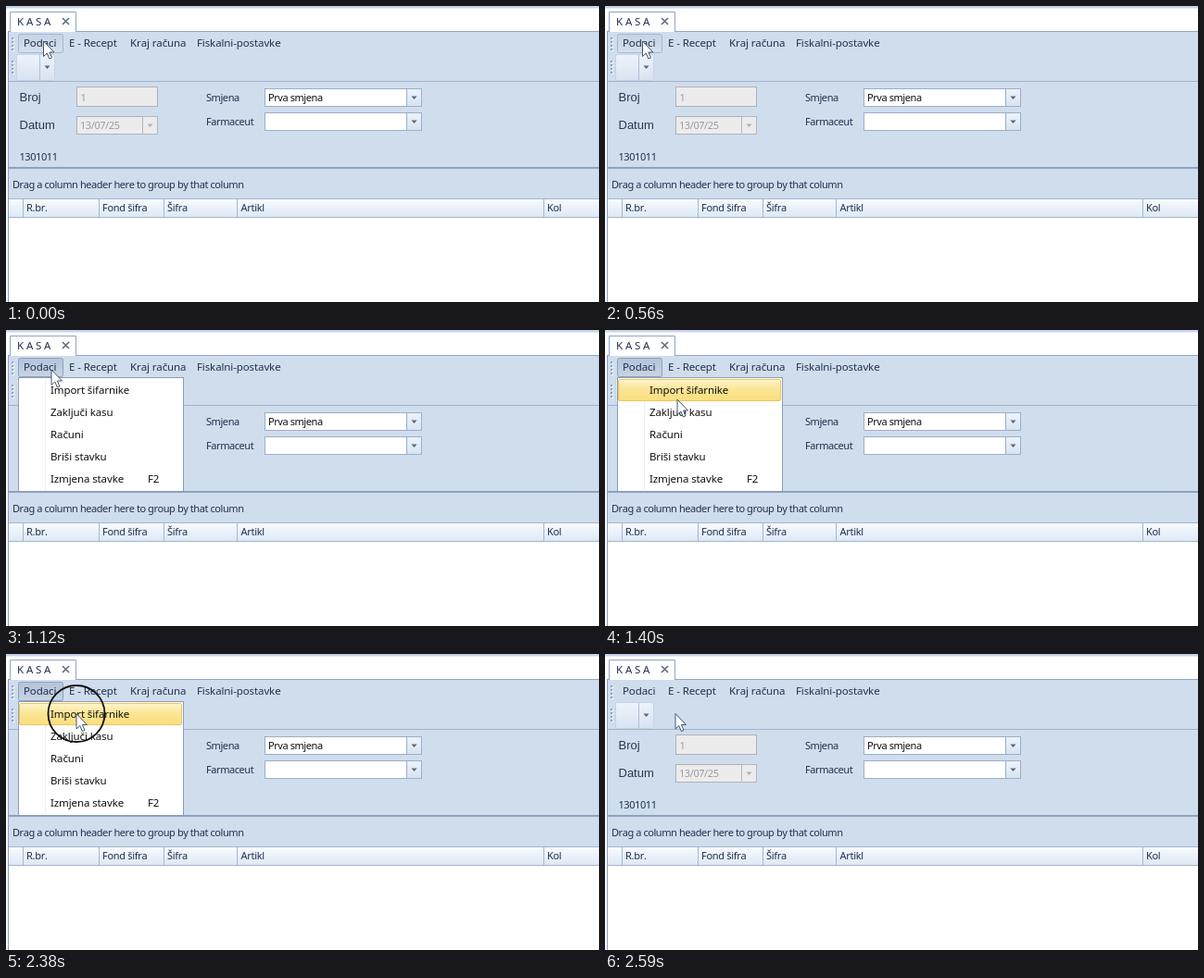
These frames come from a looping animation (640 by 320 pixels, 2660 ms). An HTML page:

```html
<!DOCTYPE html>
<html lang="hr">
<head>
<meta charset="utf-8">
<title>Kasa</title>
<style>
  html, body { margin: 0; width: 100%; height: 100%; overflow: hidden; background: #d0dded; }
  svg { display: block; width: 640px; height: 320px; }
  text { font: 11px "Noto Sans", sans-serif; font-kerning: none; letter-spacing: -.43px; fill: #20304f; white-space: pre; }
  .menu { font-size: 11.5px; letter-spacing: -.11px; }
  .head { letter-spacing: -.3px; }
  .label { font: 13px "Liberation Sans", sans-serif; letter-spacing: 0; fill: #29364f; }
  .off { fill: #999da3; }
  .black { fill: #101010; }
  .crisp { shape-rendering: crispEdges; }
</style>
</head>
<body>
<svg viewBox="0 0 640 320">
  <defs>
    <linearGradient id="header" x2="0" y2="1"><stop stop-color="#fafcff"/><stop offset="1" stop-color="#dce7f4"/></linearGradient>
    <linearGradient id="button" x2="0" y2="1"><stop stop-color="#edf3fb"/><stop offset="1" stop-color="#d8e3f1"/></linearGradient>
    <linearGradient id="hover" x2="0" y2="1"><stop stop-color="#c6d3e5"/><stop offset="1" stop-color="#d6e0ed"/></linearGradient>
    <linearGradient id="pressed" x2="0" y2="1"><stop stop-color="#b5c3d8"/><stop offset="1" stop-color="#c8d4e5"/></linearGradient>
    <linearGradient id="gold" x2="0" y2="1"><stop stop-color="#fff5cd"/><stop offset=".45" stop-color="#fbe596"/><stop offset="1" stop-color="#fbdf7d"/></linearGradient>
  </defs>
  <g id="screen"></g>
  <g id="popup"></g>
  <circle id="ring" r="30.5" fill="none" stroke="#111" stroke-width="1.8"/>
  <path id="cursor" d="M0 0V16.5L3.8 13 6.4 19 9 17.9 6.4 12H11.5Z" fill="#fff" stroke="#46566f" stroke-width="1"/>
</svg>
<script>
const LOOP = 2660, STEP = 70;
const $ = id => document.getElementById(id);
const line = (x1, y1, x2, y2, color, width = 1) =>
  `<path class="crisp" d="M${x1} ${y1}L${x2} ${y2}" stroke="${color}" stroke-width="${width}"/>`;
const box = (x, y, w, h, fill, stroke = "none", extra = "") =>
  `<rect x="${x + .5}" y="${y + .5}" width="${w}" height="${h}" fill="${fill}" stroke="${stroke}" ${extra}/>`;
const text = (x, y, s, cls = "") => `<text x="${x}" y="${y}" class="${cls}">${s}</text>`;
const arrow = (x, y, color = "#5a6679") => `<path d="M${x - 3} ${y}h6l-3 3.5z" fill="${color}"/>`;
const grip = y => [0, 4, 8, 12].map(d =>
  box(6.5, y + d + .5, 2, 2, "#f3f7fc") + box(5.5, y + d - .5, 2, 2, "#8fa3c0")).join("");
const combo = y => box(279, y, 169, 19, "#fff", "#9aafcb") +
  box(432, y, 16, 19, "url(#button)", "#9aafcb") + arrow(440.5, y + 8.5);

$("screen").innerHTML = [
  box(-.5, -.5, 640, 320, "#fff"),
  box(1.5, 26.5, 639, 181, "#d0dded"),
  line(0, 1, 640, 1, "#c6d5e8", 2), line(0, 2.5, 640, 2.5, "#e3ecf6"),
  line(2.5, 27.5, 640, 27.5, "#91a6c3"), line(2.5, 27, 2.5, 320, "#8ba1bf"),
  `<path d="M4.5 28V6.5h71V28" fill="#fff" stroke="#91a6c3"/>`,
  text(12, 21, "K A S A", "menu"),
  `<path d="M61 13l7 7m0-7l-7 7" stroke="#5f6c82" stroke-width="1.6"/>`,

  grip(34), grip(59),
  box(13, 30, 48, 20, "none", "none", 'id="tab" rx="2"'),
  text(19, 44, "Podaci", "menu"), text(68, 44, "E - Recept", "menu"),
  text(134, 44, "Kraj računa", "menu"), text(206, 44, "Fiskalni-postavke", "menu"),
  box(11, 52, 41, 28, "url(#button)", "#c6d4e7", 'rx="2"'),
  line(36.5, 53, 36.5, 80, "#b0c1d8"), arrow(44.5, 64.5),
  line(3, 81.5, 640, 81.5, "#9fb2cc"),

  text(14.5, 103, "Broj", "label"), text(14.5, 133, "Datum", "label"),
  box(76, 87, 87, 21, "#ececec", "#adb2b9"), text(80.5, 103, "1", "off"),
  box(76, 119, 87, 19, "#ececec", "#adb2b9"), text(80, 133, "13/07/25", "off"),
  box(147, 119, 16, 19, "#ececec", "#b3b8bf"), arrow(155.5, 127.5, "#acafb4"),
  text(14.5, 167, "1301011"),
  text(216, 103, "Smjena"), text(216, 129, "Farmaceut"),
  combo(89), combo(115), text(283, 103, "Prva smjena", "black"),

  line(3, 175, 640, 175, "#8da2c0", 2),
  text(7, 197, "Drag a column header here to group by that column"),
  box(2.5, 207.5, 638, 21, "url(#header)"),
  line(3, 208.5, 640, 208.5, "#a3b6d0"), line(3, 228.5, 640, 228.5, "#a3b6d0"),
  ...[18, 100, 170, 249, 580].map(x => line(x + .5, 208, x + .5, 229, "#a3b6d0")),
  ...[[22, "R.br."], [104, "Fond šifra"], [174, "Šifra"], [253.5, "Artikl"], [584, "Kol"]]
    .map(([x, s]) => text(x, 222, s, "head"))
].join("");

$("popup").innerHTML = [
  box(13, 51, 178, 123, "#fff", "#8c9cb5"),
  line(42.5, 53, 42.5, 173, "#edf0f4"),
  box(14, 53, 175, 23, "url(#gold)", "#e6c661", 'id="highlight" rx="1.5"'),
  ...["Import šifarnike", "Zaključi kasu", "Računi", "Briši stavku", "Izmjena stavke"]
    .map((s, i) => text(48, 69 + 24 * i, s, "menu black")),
  text(153, 165, "F2", "menu black")
].join("");

// Cursor tip on each step of the move, with a small overshoot at the end.
const MOVE_START = 1120;
const path = [[49, 43], [59, 51], [68, 60], [75, 69], [78, 75], [78, 72], [77, 67], [76, 64.5]];

function cursorAt(t) {
  if (t < MOVE_START) return [40.5, 38];
  return path[Math.min(path.length - 1, Math.floor((t - MOVE_START) / STEP))];
}

const show = (id, on) => $(id).setAttribute("visibility", on ? "inherit" : "hidden");
const clicked = (t, start) => t >= start && t < start + STEP;

function draw(now) {
  const t = now % LOOP;
  const [x, y] = cursorAt(t);
  const open = t >= 630 && t < 2520;
  show("popup", open);
  show("highlight", open && y > 53);
  show("ring", clicked(t, 490) || clicked(t, 2380));
  $("ring").setAttribute("transform", `translate(${x} ${y})`);
  $("cursor").setAttribute("transform", `translate(${x} ${y})`);
  const tab = $("tab");
  tab.setAttribute("fill", open ? "url(#pressed)" : t < 630 ? "url(#hover)" : "none");
  tab.setAttribute("stroke", open ? "#8ea1bd" : t < 630 ? "#a5b7d0" : "none");
}

const start = performance.now();
(function frame() {
  draw(performance.now() - start);
  requestAnimationFrame(frame);
})();
</script>
</body>
</html>
```
